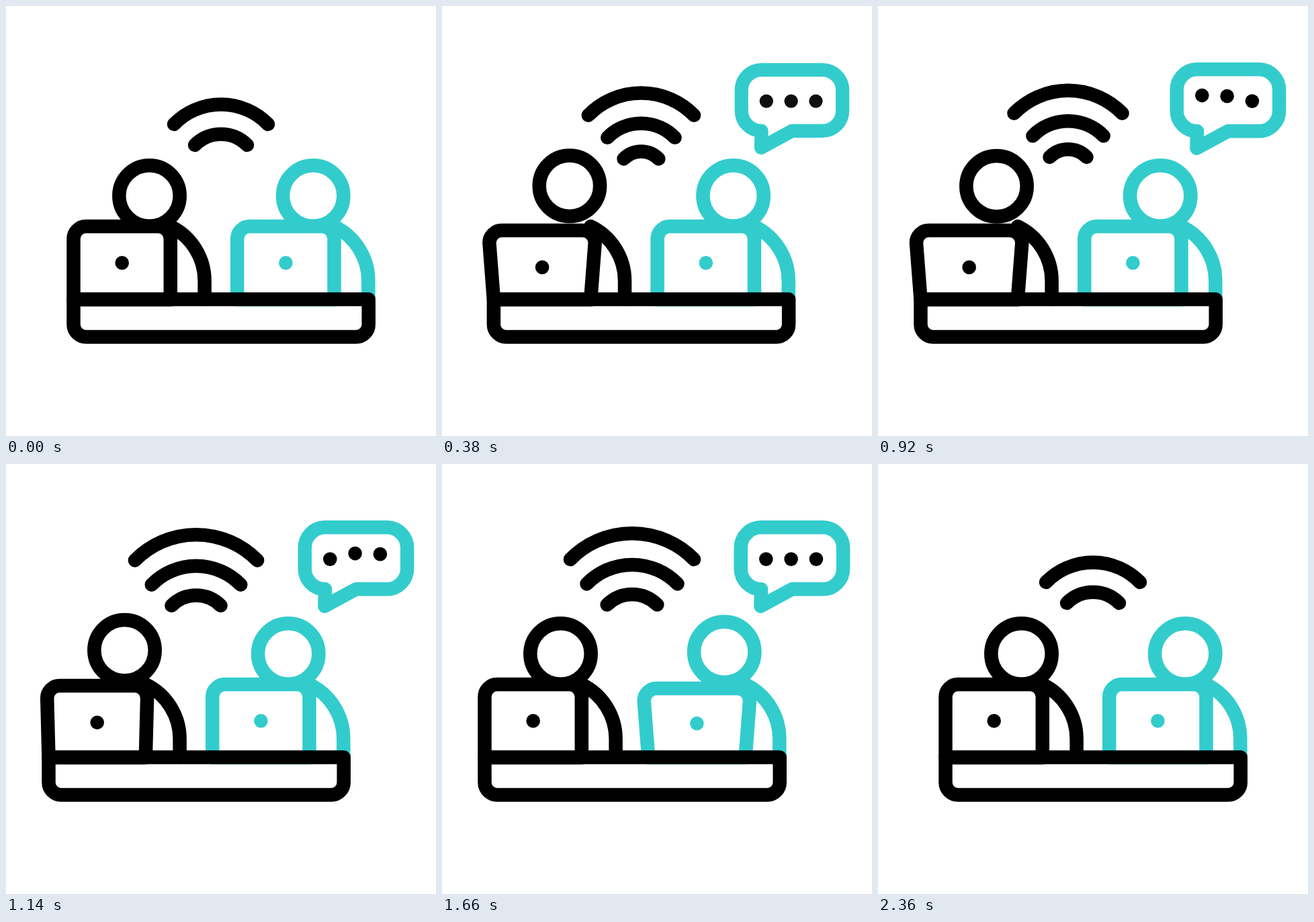
Write an HTML page with a canvas that moves like this. It is 640 by 640 pixels and loops after 2.4 s.

```html
<!DOCTYPE html>
<html lang="en">
<head>
<meta charset="utf-8">
<title>Coworking</title>
<style>
  html, body { margin: 0; width: 100%; height: 100%; overflow: hidden; background: #fff; }
  canvas { display: block; }
</style>
</head>
<body>
<canvas id="stage" width="640" height="640"></canvas>
<script>
const ctx = document.getElementById('stage').getContext('2d');
const LOOP = 2400, STEP = 20, BLACK = '#000', TEAL = '#33cccc';

const linear = (t, from, to) => Math.min(1, Math.max(0, (t - from) / (to - from)));
const ease = (t, from, to) => {
  const p = linear(t, from, to);
  return p * p * (3 - 2 * p);
};
// Rises to 1 and falls back to 0, each taking half the time
const bump = (t, start, half = 300) =>
  ease(t, start, start + half) - ease(t, start + half, start + 2 * half);
const hold = (t, start) => ease(t, start, start + 300) - ease(t, start + 900, start + 1200);

function stroke(path, color = BLACK) {
  ctx.strokeStyle = color;
  ctx.stroke(new Path2D(path));
}

function circle(x, y, r, color, filled) {
  ctx.beginPath();
  ctx.arc(x, y, r, 0, 2 * Math.PI);
  ctx.fillStyle = ctx.strokeStyle = color;
  if (filled) ctx.fill(); else ctx.stroke();
}

function shifted(x, y, draw) {
  ctx.save();
  ctx.translate(x, y);
  draw();
  ctx.restore();
}

function person(t, start, color, dotDrop) {
  const tilt = hold(t, start);
  const nod = 15 * (bump(t, start) + bump(t, start + 600));
  const left = 100.5 - 6.5 * tilt, right = 244.8 + 6.5 * tilt, top = 328 + 6 * tilt;
  circle(213.5, 282.5 - nod, 45.2, color);
  stroke('M295.6 436V409A90 90 0 0 0 244.8 328', color);
  stroke(`M100.5 436.9L${left} ${top + 18.5}a18.5 18.5 0 0 1 18.5 -18.5
    H${right - 18.5}a18.5 18.5 0 0 1 18.5 18.5L244.8 436.9Z`, color);
  circle(172.7, 382.4 + dotDrop * tilt, 10.3, color, true);
}

// Half width, end height and top of a signal arc at each stop on its way up
const STOPS = [[18.5, 239, 231], [39, 207, 190.8], [70, 176, 146.4], [94, 139, 99.5]];

function signalArc(p) {
  const i = Math.min(2, Math.floor(p)), f = p - i;
  const [w, y, top] = STOPS[i].map((v, k) => v + (STOPS[i + 1][k] - v) * f);
  const drop = y - top, r = (w * w + drop * drop) / (2 * drop);
  stroke(`M${320 - w} ${y}A${r} ${r} 0 0 1 ${320 + w} ${y}`);
}

function signal(t) {
  const sent = 4 * linear(t, 200, 2200);
  const moving = t >= 200 && t <= 2200;
  for (let n = -2; n < 4; n++) {
    const p = sent - n;
    if ((p > 0 && p < 3) || (moving && (p === 0 || p === 3))) signalArc(p);
  }
}

function bubble(t) {
  const scale = 0.615 + 0.385 * (ease(t, 60, 420) - ease(t, 1740, 2340));
  ctx.save();
  ctx.globalAlpha = linear(t, 60, 260) - linear(t, 2140, 2340);
  ctx.translate(520.8, 158.5);
  ctx.scale(scale, scale);
  ctx.translate(-520.8, -158.5);
  stroke(`M475 186.3a30.3 30.3 0 0 1 -30.3 -30.3V124.6a30.3 30.3 0 0 1 30.3 -30.3H566.8
    a30.3 30.3 0 0 1 30.3 30.3V156a30.3 30.3 0 0 1 -30.3 30.3H521L474.4 211.6Z`, TEAL);
  ctx.restore();

  ctx.save();
  ctx.globalAlpha = linear(t, 60, 400) - linear(t, 1940, 2340);
  ctx.translate(519.6, 141.6);
  ctx.scale(scale, scale);
  for (let i = 0; i < 3; i++)
    circle(37.3 * (i - 1), -11.5 * bump(t, 520 + 220 * i), 10.3, BLACK, true);
  ctx.restore();
}

function draw(t) {
  ctx.fillStyle = '#fff';
  ctx.fillRect(0, 0, 640, 640);
  ctx.lineWidth = 20.5;
  ctx.lineCap = ctx.lineJoin = 'round';
  const slide = -37 * (ease(t, 60, 600) - ease(t, 1740, 2340));
  shifted(slide, 0, () => {
    signal(t);
    shifted(243.7, 0, () => person(t, 1140, TEAL, 3.7));
    person(t, 60, BLACK, 6.5);
    stroke(`M100.5 436.5H539.7V474a18.5 18.5 0 0 1 -18.5 18.5H119
      a18.5 18.5 0 0 1 -18.5 -18.5Z`);
  });
  bubble(t);
}

function tick() {
  draw(Math.floor(performance.now() / STEP + 0.01) * STEP % LOOP);
  requestAnimationFrame(tick);
}
tick();
</script>
</body>
</html>
```
